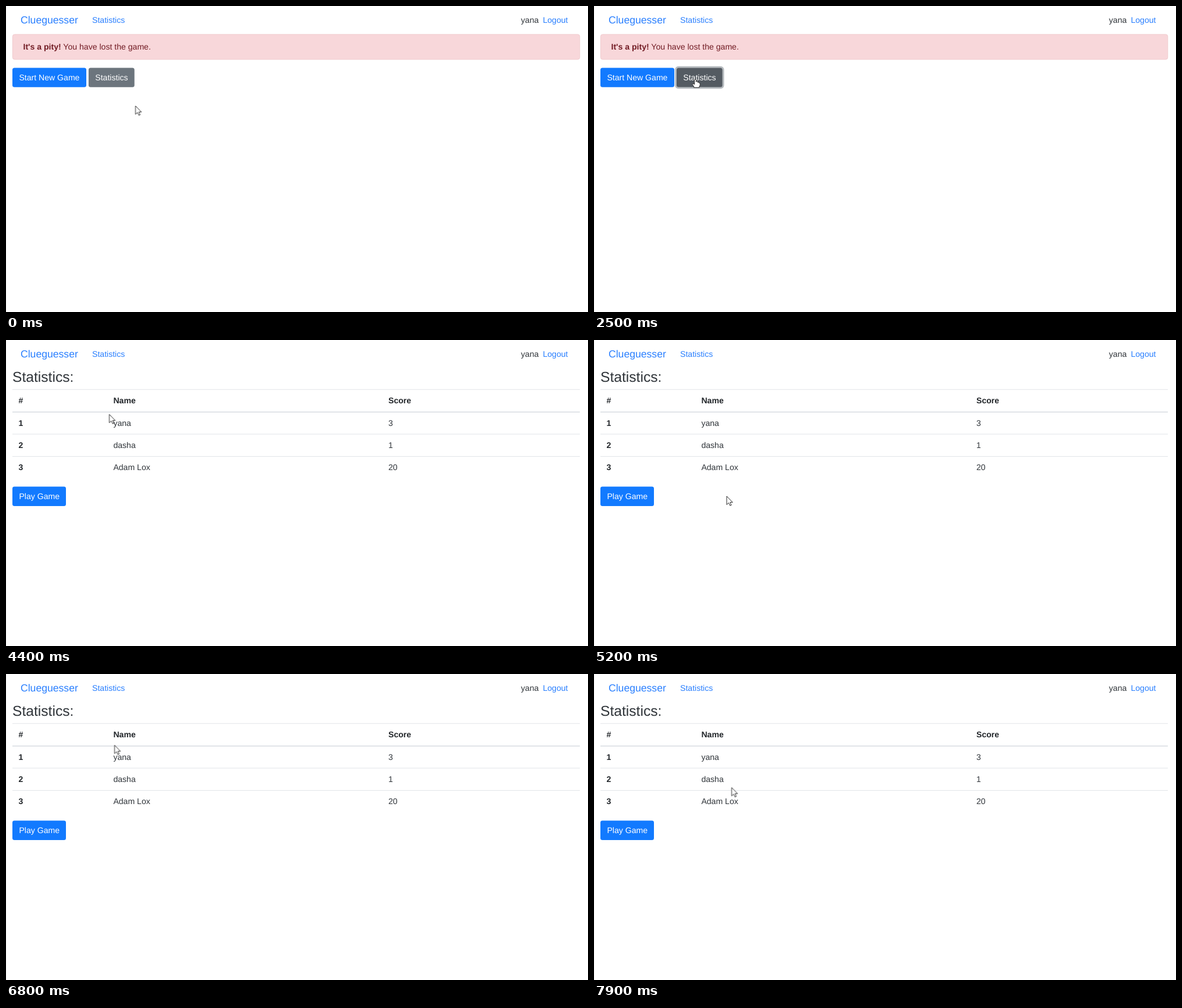
Animation, 1000 px wide and 527 px high, one loop 8000 ms. Source, as an HTML page:

```html
<!DOCTYPE html>
<html lang="en">
<head>
<meta charset="utf-8">
<title>Game statistics</title>
<style>
  html, body { margin: 0; width: 100%; height: 100%; overflow: hidden; background: #fff; }
  svg { display: block; width: 100%; height: 100%; }
  text {
    font: 14.08px "Liberation Sans", Arial, sans-serif;
    fill: #30353a;
    text-rendering: geometricPrecision;
  }
  .link { fill: #297fff; }
  .brand { font-size: 17.6px; }
  .title { font-size: 24.64px; }
  .bold { font-weight: 700; fill: #212529; }
  .alert, .alert .bold { fill: #721c24; }
  .label { fill: #fff; }
  .primary { fill: #127aff; }
  .line { fill: #dee2e6; }
  .cursor path { fill: #fff; stroke: #2b2b2b; stroke-linejoin: round; }
  #stats, #hand { visibility: hidden; }
</style>
</head>
<body>
<svg viewBox="0 0 1000 527">
  <rect width="1" height="527" fill="#f4f4f4"/>
  <text class="link brand" x="25" y="29.7">Clueguesser</text>
  <text class="link" x="148" y="28.6">Statistics</text>
  <text x="915.3" y="28.6" text-anchor="end">yana</text>
  <text class="link" x="922.4" y="28.6">Logout</text>

  <g id="lost">
    <rect x="11.4" y="48.9" width="974.4" height="43.1" rx="3.5" fill="#f8d7da" stroke="#f0c6ca" stroke-width=".88"/>
    <text class="alert" x="29.5" y="75.3"><tspan class="bold">It's a pity!</tspan> You have lost the game.</text>
    <rect class="primary" x="11" y="106.5" width="127" height="33.2" rx="3.5"/>
    <text class="label" x="22.4" y="128">Start New Game</text>
    <rect id="ring" x="140.5" y="105.1" width="81.6" height="36" rx="4.5" fill="none" stroke="#6c757d" stroke-width="2.8" opacity="0"/>
    <rect id="button" x="141.9" y="106.5" width="78.8" height="33.2" rx="3.5" fill="#6c757d"/>
    <text class="label" x="153.3" y="128">Statistics</text>
  </g>

  <g id="stats">
    <text class="title" x="11" y="71.6">Statistics:</text>
    <g id="table"></g>
    <rect class="primary" x="11" y="252.6" width="92" height="33.4" rx="3.5"/>
    <text class="label" x="22.4" y="274.2">Play Game</text>
  </g>

  <g id="pointer" class="cursor">
    <path id="arrow" d="M0 0V14.6L3.4 11.4 5.8 16.3 8 15.3 5.8 10.6H10.2Z"/>
    <path id="hand" d="M-1.4 1Q0-.7 1.4 1V4.8Q4-.0 4 5.4 6.2 4.8 6.4 6.3 8.2 6.2 8.2 8V10.4L7 12.6V14.4H-2.4V12.6L-4.9 9.3Q-5.4 7.4-3.8 7.7L-1.4 9Z"/>
  </g>
</svg>
<script>
const LOOP = 8000, TICK = 100;
const byId = id => document.getElementById(id);

// Table
const columns = [21.6, 184.4, 657], rowHeight = 38.4;
const rows = ["# Name Score", "1 yana 3", "2 dasha 1", "3 Adam\u00a0Lox 20"];

function add(tag, attrs, content = "") {
  const node = document.createElementNS("http://www.w3.org/2000/svg", tag);
  for (const key in attrs) node.setAttribute(key, attrs[key]);
  node.textContent = content;
  byId("table").append(node);
}
rows.forEach((row, r) => {
  const top = 84.8 + r * rowHeight;
  add("rect", { class: "line", x: 11, y: top, width: 975, height: r === 1 ? 1.8 : 0.9 });
  row.split(" ").forEach((cell, c) =>
    add("text", { x: columns[c], y: top + 24.3, class: r && c ? "" : "bold" }, cell));
});

// Each step is [time, value] and holds until the next one.
function play(id, prop, steps) {
  const frames = [...steps, [LOOP, steps.at(-1)[1]]].map(([time, value]) =>
    ({ offset: time / LOOP, [prop]: value, easing: "steps(1, end)" }));
  byId(id).animate(frames, { duration: LOOP, iterations: Infinity });
}

const show = (id, steps) =>
  play(id, "visibility", steps.map(([time, on]) => [time, on ? "visible" : "hidden"]));

show("lost", [[0, 1], [2600, 0]]);
show("stats", [[0, 0], [2600, 1]]);
show("arrow", [[0, 1], [600, 0], [4400, 1]]);
show("hand", [[0, 0], [600, 1], [4400, 0]]);

play("button", "fill", [[0, "#6c757d"], [600, "#636b73"], [700, "#5a6268"], [2100, "#545b62"]]);
play("ring", "opacity", [[0, 0], [2100, 0.25], [2200, 0.5]]);

// Smooth curve through [time, x, y] keys, at rest at both ends
function along(keys, time) {
  const i = Math.max(0, keys.findIndex(key => key[0] >= time) - 1);
  const a = keys[i], b = keys[i + 1], span = b[0] - a[0];
  const u = (time - a[0]) / span, v = 1 - u;
  const slope = (k, axis) => {
    const before = keys[k - 1], after = keys[k + 1];
    return before && after ? (after[axis] - before[axis]) / (after[0] - before[0]) : 0;
  };
  return [1, 2].map(axis =>
    v * v * (1 + 2 * u) * a[axis] + u * u * (1 + 2 * v) * b[axis] +
    span * u * v * (v * slope(i, axis) - u * slope(i + 1, axis)));
}

function trace(keys) {
  const steps = [];
  for (let time = keys[0][0]; time <= keys.at(-1)[0]; time += TICK) {
    const [x, y] = along(keys, time);
    steps.push([time, `translate(${x}px, ${y}px)`]);
  }
  return steps;
}

const approach = [[0, 222.5, 172], [100, 222.5, 172], [600, 194, 134], [1100, 180, 122], [1300, 174, 126]];
const circling = [
  [4400, 177.5, 128], [4900, 254, 200], [5200, 228, 269], [5400, 180, 306], [5600, 151, 215],
  [5900, 198.5, 126], [6200, 269, 210], [6400, 222, 256], [6600, 161.5, 193],
  [6800, 186.5, 122.5], [7100, 239, 192], [7300, 211, 248], [7500, 175.5, 204],
  [7700, 196, 131], [7900, 236.5, 195.5]
];
play("pointer", "transform", [...trace(approach), ...trace(circling)]);
</script>
</body>
</html>
```
